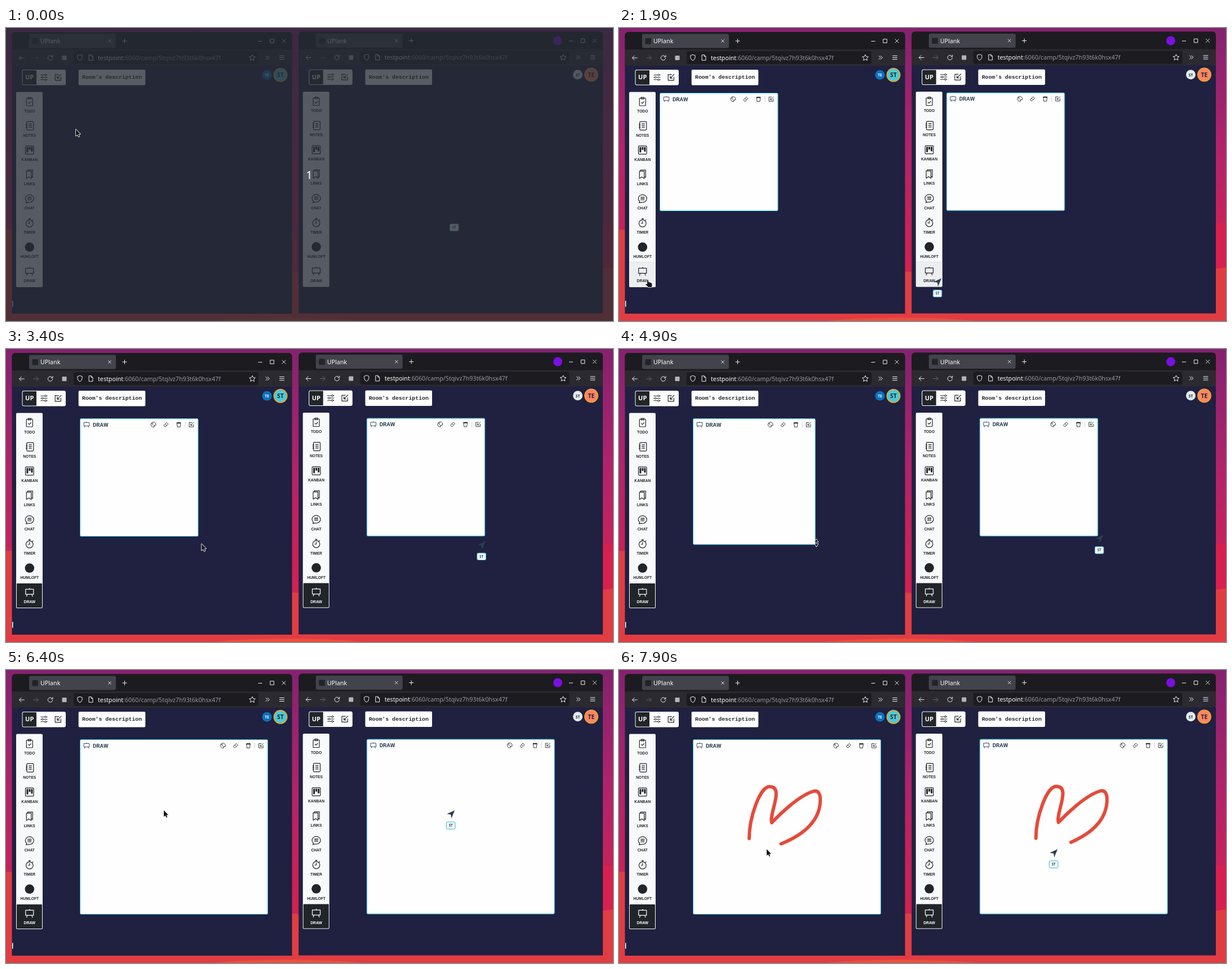
Animation of 1077x520 px, one loop 8000 ms. Source, as an HTML page with a canvas:

```html
<!DOCTYPE html>
<html lang="en">
<head>
<meta charset="utf-8">
<title>Shared board</title>
<style>
html, body { margin: 0; width: 100%; height: 100%; overflow: hidden; background: #202040; }
canvas { display: block; }
</style>
</head>
<body>
<canvas id="stage" width="1077" height="520"></canvas>
<script>
const ctx = document.getElementById('stage').getContext('2d');
const LOOP = 8000, STEP = 100, LAG = 100;
const INK = '#212529', SLATE = '#2c3e50', PAPER = '#f8f9fa', WHITE = '#fefefe';
const CYAN = '#25b5d6', LIGHT = '#f0f0f4';
const SANS = '"Noto Sans", sans-serif';
const LABEL = '"Liberation Sans", Arial, sans-serif';

// Moments of the story
const OPEN = 1900, GRAB = 2800, DROP = 3000, PULL = 4800, RELEASE = 5700, PEN_DOWN = 7000, PEN_UP = 7900;

// Path helpers
function poly(p, x, y, ...rest) {
  p.moveTo(x, y);
  for (let i = 0; i < rest.length; i += 2) p.lineTo(rest[i], rest[i + 1]);
}
function rows(p, x, w, y, gap, n = 3) {
  for (let i = 0; i < n; i++) poly(p, x, y + i * gap, x + w, y + i * gap);
}
function ring(p, x, y, r) {
  p.moveTo(x + r, y);
  p.arc(x, y, r, 0, Math.PI * 2);
}
function flag(p, x, y, w, h) {
  poly(p, x, y + h, x, y, x + w, y, x + w, y + h, x + w / 2, y + h - 3, x, y + h);
}

// Icons live in a 16 x 16 box
const OUTLINES = {
  todo(p) { p.roundRect(2.5, 2, 11, 13.5, 1); p.rect(5.5, 0.5, 5, 3); poly(p, 5.5, 9.3, 7.5, 11.3, 10.8, 8); },
  notes(p) { p.roundRect(3, 0.5, 12, 15, 1.5); rows(p, 1.3, 3, 5, 3); rows(p, 6.5, 5.5, 4.5, 3); },
  kanban(p) { p.roundRect(0.7, 0.7, 14.6, 14.6, 1.3); },
  links(p) { flag(p, 2.5, 2.5, 8.5, 13); poly(p, 4.5, 2.5, 4.5, 0.5, 13.5, 0.5, 13.5, 13.5, 11, 12); },
  chat(p) { p.ellipse(8, 8, 7.5, 6.8, 0, 2.3, 8); p.lineTo(1.8, 15.5); p.closePath(); rows(p, 4.5, 7, 5.7, 2.3); },
  timer(p) { ring(p, 8, 9, 6.3); rows(p, 6, 4, 0.6, 0, 1); poly(p, 8, 0.5, 8, 2.7); poly(p, 12.7, 4.2, 14.5, 2.4); poly(p, 8, 5, 8, 9, 5, 9); },
  draw(p) { p.rect(1, 2.5, 14, 9); poly(p, 8, 0.3, 8, 2.5); poly(p, 4, 11.5, 2.6, 15.5); poly(p, 12, 11.5, 13.4, 15.5); },
  sliders(p) { for (let i = 0; i < 3; i++) { const x = i % 2 ? 4.8 : 11.3, y = 3.2 + 4.8 * i; poly(p, 1, y, x - 1.7, y); ring(p, x, y, 1.7); poly(p, x + 1.7, y, 15, y); } },
  edit(p) { poly(p, 9.5, 2, 1.5, 2, 1.5, 14.5, 14, 14.5, 14, 7); poly(p, 15, 1, 6, 10); poly(p, 6, 5, 6, 10, 11, 10); },
  palette(p) { p.arc(8, 8, 7.2, 1.3, 6.6); p.lineTo(11, 10.3); p.closePath(); },
  eraser(p) { poly(p, 9.5, 1.8, 14.2, 6.5, 6.5, 14.2, 4.5, 14.2, 1.3, 10.5); p.closePath(); poly(p, 5.3, 6, 10, 10.7); },
  trash(p) { poly(p, 2.5, 3, 13.5, 3, 12, 15, 4, 15); p.closePath(); },
  shield(p) { poly(p, 8, 1, 13.5, 3, 13.5, 7.5); p.quadraticCurveTo(13, 13, 8, 15); p.quadraticCurveTo(3, 13, 2.5, 7.5); p.lineTo(2.5, 3); p.closePath(); },
  page(p) { poly(p, 9, 1, 9, 5, 13, 5, 9, 1, 3, 1, 3, 15, 13, 15, 13, 5); },
  star(p) {
    for (let i = 0; i < 10; i++) {
      const r = i % 2 ? 3.6 : 7.5, a = Math.PI * i / 5;
      p.lineTo(8 + r * Math.sin(a), 8.5 - r * Math.cos(a));
    }
    p.closePath();
  },
  back(p) { poly(p, 15, 8, 1.5, 8); poly(p, 7.5, 2, 1.5, 8, 7.5, 14); },
  next(p) { poly(p, 1, 8, 14.5, 8); poly(p, 8.5, 2, 14.5, 8, 8.5, 14); },
  reload(p) { p.arc(8, 8, 6, 0, 5.7); poly(p, 14.5, 1, 14.5, 5.5, 10, 5.5); },
  more(p) { for (const x of [2, 8]) poly(p, x, 2, x + 6, 8, x, 14); },
  menu(p) { rows(p, 1, 14, 3, 5); },
  plus(p) { poly(p, 8, 1, 8, 15); poly(p, 1, 8, 15, 8); },
  close(p) { poly(p, 2, 2, 14, 14); poly(p, 14, 2, 2, 14); }
};
const SOLIDS = {
  kanban(p) { [9.5, 5, 8].forEach((h, i) => p.rect(2.6 + 4 * i, 2.6, 3, h)); },
  music(p) { ring(p, 8, 8, 8.3); },
  palette(p) { for (let i = 0; i < 4; i++) ring(p, 8 - 4 * Math.cos(i - 1), 8 + 4 * Math.sin(i - 2), 1.2); },
  trash(p) { p.rect(2, 1.5, 12, 3.3); }
};
const ARROW = new Path2D('M0 0V11.5L2.7 9.2L4.5 13L6.3 12.2L4.6 8.5L8 8.2Z');
const HAND = new Path2D('M0 1Q1-1 2 1L2.5 4.5Q5 3.8 8 6Q9.500 9 8 13H2Q0 10-2.8 8.500Q-3 6.500 0 7.800Z');
const RESIZE = new Path2D('M0-7L3-2H-3ZM0 6L3 1H-3Z');
const POINTER = new Path2D('M7-27L-7-20.5L0-19.5L1-12.5Z');

const TOOLS = ['todo', 'notes', 'kanban', 'links', 'chat', 'timer', 'music', 'draw'];
const TOOL_NAMES = { music: 'HUMLOFT' };

// Mouse legs: from, to, end point
const HOME = [286, 327];
const LEGS = [
  [-100, 0, 124, 180],
  [0, 700, 149, 182],
  [1000, 1850, 50, 447],
  [2000, 2600, 150, 121],
  [GRAB, DROP, 209, 129],
  [DROP, 3330, 347, 346],
  [3500, 4500, 343, 330],
  [4850, 5400, 423, 433],
  [5400, RELEASE, 466.5, 431],
  [6000, 6250, 280, 249],
  [6500, 6900, 231, 299]
];

const STROKE = 'M231 299C231 262 250 207 267 207C294 207 266 254 271 271' +
  'C285 256 318 224 344 215.5C355 212 358 222 357 235C354 275 318 296 289 308L262 318';
const strokePath = new Path2D(STROKE);
const strokeShape = document.createElementNS('http://www.w3.org/2000/svg', 'path');
strokeShape.setAttribute('d', STROKE);
const strokeLength = strokeShape.getTotalLength();

const clamp = (v, a, b) => Math.max(a, Math.min(b, v));
const easeOut = (k, power) => 1 - (1 - k) ** power;

function penAt(t) {
  const k = clamp((t - PEN_DOWN) / (PEN_UP - PEN_DOWN), 0, 1);
  return strokeLength * easeOut(k, 1.25);
}

function cursorAt(t) {
  if (t >= PEN_DOWN) {
    const p = strokeShape.getPointAtLength(penAt(t));
    return [p.x, p.y];
  }
  let [x, y] = HOME;
  for (const [from, to, endX, endY] of LEGS) {
    const k = clamp((t - from) / (to - from), 0, 1);
    x += (endX - x) * k;
    y += (endY - y) * easeOut(k, 1.6);
  }
  return [x, y];
}

// Distance the mouse has dragged between two moments
function drag(t, from, to) {
  const [ax, ay] = cursorAt(from), [bx, by] = cursorAt(clamp(t, from, to));
  return [bx - ax, by - ay];
}

function box(x, y, w, h, r, fill, line, lw = 1) {
  ctx.beginPath();
  ctx.roundRect(x, y, w, h, r);
  if (fill) { ctx.fillStyle = fill; ctx.fill(); }
  if (line) { ctx.strokeStyle = line; ctx.lineWidth = lw; ctx.stroke(); }
}

function bar(x, y, w, h, color) {
  ctx.fillStyle = color;
  ctx.fillRect(x, y, w, h);
}

function disc(x, y, r, fill, line, lw) {
  ctx.beginPath();
  ctx.arc(x, y, r, 0, Math.PI * 2);
  ctx.fillStyle = fill;
  ctx.fill();
  if (line) { ctx.strokeStyle = line; ctx.lineWidth = lw; ctx.stroke(); }
}

function text(str, x, y, font, color, align = 'left') {
  ctx.font = font;
  ctx.fillStyle = color;
  ctx.textAlign = align;
  ctx.fillText(str, x, y);
}

function glyph(name, x, y, size, color, lw = 1) {
  const k = size / 16;
  ctx.save();
  ctx.translate(x - size / 2, y - size / 2);
  ctx.scale(k, k);
  ctx.lineWidth = lw / k;
  ctx.lineJoin = 'round';
  ctx.strokeStyle = ctx.fillStyle = color;
  for (const [set, paint] of [[OUTLINES, 'stroke'], [SOLIDS, 'fill']]) {
    if (!set[name]) continue;
    ctx.beginPath();
    set[name](ctx);
    ctx[paint]();
  }
  ctx.restore();
}

function wallpaper() {
  const g = ctx.createLinearGradient(0, 0, 0, 520);
  ['#84226f', '#b3236a', '#d3214f'].forEach((c, i) => g.addColorStop(i * 0.42, c));
  bar(0, 0, 1077, 520, g);
  bar(1050, 347, 27, 90, '#d81f50');
  ctx.fillStyle = '#e23c43';
  ctx.beginPath();
  ctx.moveTo(0, 358);
  ctx.quadraticCurveTo(200, 365, 507, 432);
  ctx.quadraticCurveTo(800, 460, 1077, 425);
  ctx.lineTo(1077, 520);
  ctx.lineTo(0, 520);
  ctx.fill();
  ctx.fillStyle = '#e9503d';
  ctx.beginPath();
  ctx.ellipse(500, 535, 190, 21, 0, 0, Math.PI * 2);
  ctx.fill();
}

function chrome(ex, priv) {
  const w = 497 + ex, top = [6, 6, 0, 0];
  box(10.5, 7, w, 500, top, '#202040');
  box(10.5, 7, w, 31.5, top, '#1c1b20');
  bar(10.5, 38, w, 29, '#2b2a31');
  box(41, 10.5, 154, 25, 3, '#42434b');
  box(46.5, 18, 10.5, 10.5, 1, INK);
  const font = '10.7px ' + SANS;
  text('UPlank', 61, 27, font, WHITE);
  glyph('close', 184, 23, 7, LIGHT, 0.9);
  glyph('plus', 210.5, 23, 9, LIGHT);
  if (priv) disc(470.3, 23, 8, '#7a10de');
  bar(447.5 + ex, 23, 7, 1, LIGHT);
  box(468.8 + ex, 19.8, 6.5, 6.5, 0, null, LIGHT);
  glyph('close', 493 + ex, 23, 9, LIGHT, 0.9);

  glyph('back', 28, 53, 11, LIGHT);
  glyph('next', 53, 53, 11, '#64636a');
  glyph('reload', 78.5, 53, 11, LIGHT);
  box(99.5, 49, 8, 8, 1, '#b4b4ba');
  box(120, 41, 328 + ex, 23, 3, '#1c1b20');
  glyph('shield', 131, 52.5, 12, LIGHT);
  glyph('page', 150.5, 52.5, 11, LIGHT);
  const host = 'testpoint';
  text(host, 163, 56.5, font, WHITE);
  text(':6060/camp/5tqivz7h93t6k0hsx47f', 163 + ctx.measureText(host).width, 56.5, font, '#98989f');
  glyph('star', 437 + ex, 52.5, 12, LIGHT);
  glyph('more', 464 + ex, 52.5, 9, LIGHT);
  glyph('menu', 489.5 + ex, 52.5, 10, LIGHT);
}

function header(ex, priv) {
  box(29, 74.5, 76.5, 26.5, 2, WHITE, WHITE);
  box(29.5, 75, 24.5, 25.5, [2, 0, 0, 2], INK);
  text('UP', 41.7, 91, 'bold 11px ' + SANS, '#fff', 'center');
  glyph('sliders', 67.5, 87.5, 14, INK);
  glyph('edit', 92.5, 87.5, 13, INK, 1.2);
  bar(117, 74, 1, 27, '#27274a');
  box(128.7, 74, 118.6, 27.5, 2, WHITE);
  text("Room's description", 135, 90.3, 'bold 9.83px "Liberation Mono", monospace', INK);
  const [me, guest] = priv ? ['TE', 'ST'] : ['ST', 'TE'];
  disc(463 + ex, 83.3, 8.5, priv ? '#e0ecee' : '#0b72bf');
  text(guest, 463 + ex, 86, 'bold 6.5px ' + SANS, priv ? INK : '#fff', 'center');
  disc(487 + ex, 83.3, 11.6, priv ? '#ff8466' : '#4bc9d8', '#eda42c', 1.8);
  text(me, 487 + ex, 87.3, 'bold 10.5px ' + SANS, INK, 'center');
}

function sidebar(t) {
  const active = t >= GRAB;
  box(18, 113.5, 47, 346.5, 2, PAPER);
  if (active) box(19, 416, 45, 43, 1, INK);
  else if (t >= OPEN && t < 2200) {
    box(18.5, 416, 46, 43.5, 1, '#eceeef');
    bar(18.5, 415, 46, 1, '#cfe9f3');
  }
  TOOLS.forEach((name, i) => {
    const y = 130.5 + 43.05 * i, color = active && name === 'draw' ? '#fff' : INK;
    glyph(name, 41.8, y, 16, color, 1.2);
    text(TOOL_NAMES[name] || name.toUpperCase(), 41.8, y + 19.3, 'bold 6.7px ' + LABEL, color, 'center');
  });
}

function panel(t) {
  const [dx, dy] = drag(t, GRAB, DROP), [growX, growY] = drag(t, PULL, RELEASE);
  const x = 72.5 + dx, y = 115.5 + dy, w = 209.5 + growX, h = 209 + growY;
  const r = x + w, mid = y + 10.7;
  box(x, y, w, h, 2, WHITE, CYAN);
  glyph('draw', x + 11.5, mid, 11, SLATE, 0.9);
  text('DRAW', x + 22.5, mid + 3.7, 'bold 9.8px Roboto, sans-serif', SLATE);
  ['edit', 'trash', 'eraser', 'palette'].forEach((name, i) => glyph(name, r - 12 - 22.5 * i, mid, 9.8, INK, 0.9));
  bar(r - 23.5, mid - 5, 1, 10, '#cfd2d6');
}

function ink(t) {
  if (t <= PEN_DOWN) return;
  ctx.save();
  ctx.strokeStyle = '#e44b3a';
  ctx.lineWidth = 6;
  ctx.lineCap = ctx.lineJoin = 'round';
  ctx.setLineDash([penAt(t), strokeLength * 2]);
  ctx.stroke(strokePath);
  ctx.restore();
}

function badge(t) {
  const [x, y] = cursorAt(t < PEN_DOWN ? t - LAG : t);
  ctx.save();
  ctx.translate(x + 0.5, y + 27.5);
  if (t > 0) {
    ctx.fillStyle = SLATE;
    ctx.fill(POINTER);
  }
  box(-7.8, -6.2, 15.6, 12.4, 2, WHITE, CYAN);
  text('ST', 0, 2.3, 'bold 6.3px ' + SANS, SLATE, 'center');
  ctx.restore();
}

function view(t, priv) {
  const ex = priv ? 42.8 : 0;
  ctx.save();
  if (priv) ctx.translate(508.7, -0.5);
  chrome(ex, priv);
  header(ex, priv);
  sidebar(t);
  if (t >= OPEN) panel(priv ? t - LAG : t);
  ink(t - LAG - (priv ? 18 : 0));
  if (priv) badge(t);
  else {
    bar(11, 484, 2, 11, CYAN);
    bar(11, 485, 1, 9, WHITE);
  }
  ctx.restore();
}

function cursor(t) {
  const shape = t >= 1800 && t < 2200 ? HAND : t >= 4500 && t < 6000 ? RESIZE : ARROW;
  ctx.save();
  ctx.translate(...cursorAt(t));
  ctx.lineJoin = 'round';
  ctx.lineWidth = 1.6;
  ctx.strokeStyle = '#fff';
  ctx.stroke(shape);
  ctx.fillStyle = '#16161a';
  ctx.fill(shape);
  ctx.restore();
}

function render(t) {
  wallpaper();
  view(t, false);
  view(t, true);
  const dim = Math.max(0, 1 - t / 500);
  if (dim > 0) {
    bar(0, 0, 1077, 520, `rgba(38, 44, 52, ${0.77 * dim})`);
    text('1', 538, 267.5, '20px ' + SANS, `rgba(255, 255, 255, ${dim})`, 'center');
  }
  cursor(t);
}

const start = performance.now();
let shown = -1;
function tick() {
  const t = Math.floor((performance.now() - start) % LOOP / STEP) * STEP;
  if (t !== shown) render(shown = t);
  requestAnimationFrame(tick);
}
tick();
</script>
</body>
</html>
```
